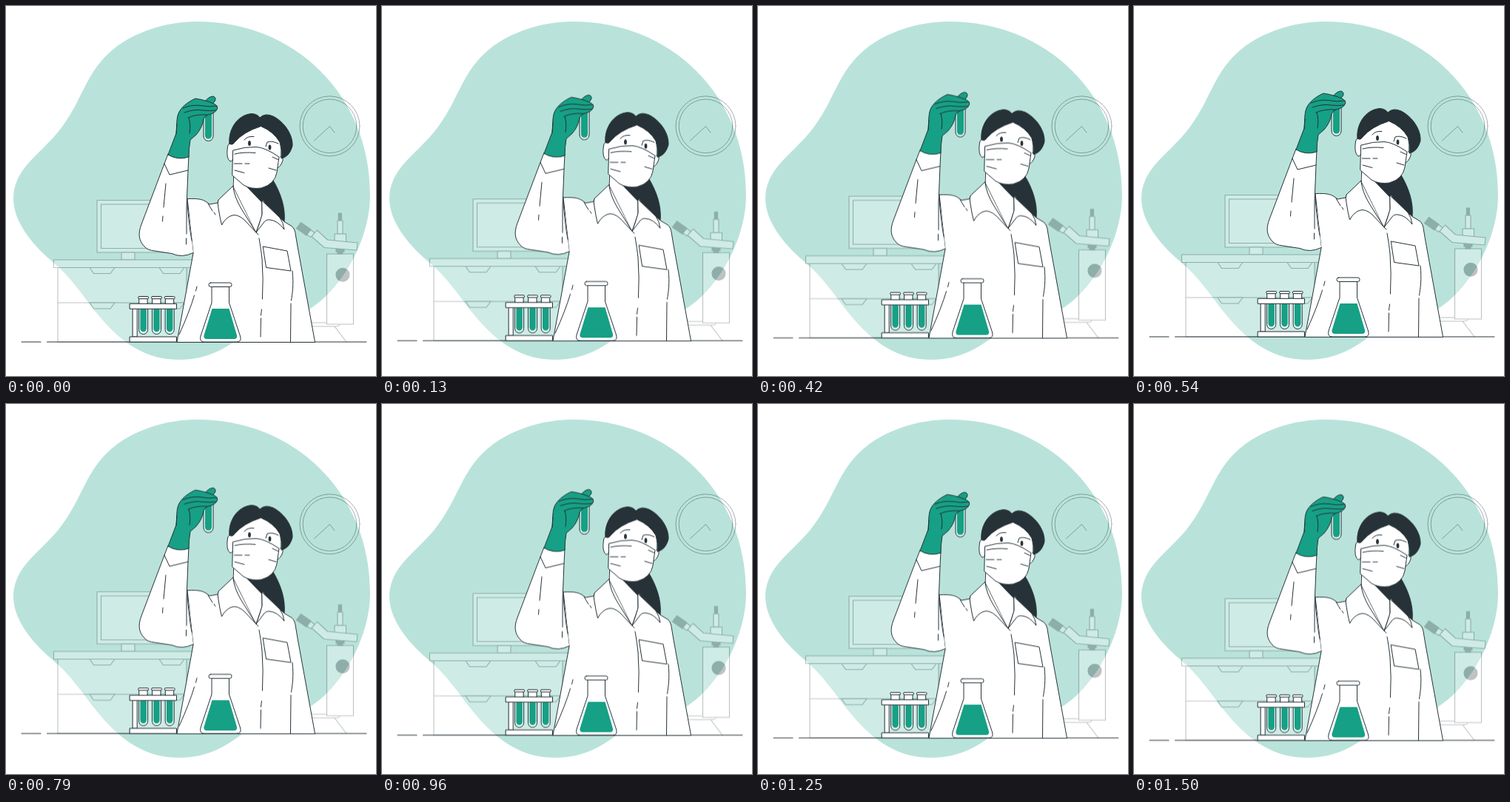
These frames come from a looping animation (500x500 px, 1540 ms). An HTML page:

```html
<!DOCTYPE html>
<html lang="en">
<head>
<meta charset="utf-8">
<title>Laboratory</title>
<style>
  html, body { margin: 0; width: 100%; height: 100%; overflow: hidden; background: #fff; }
  svg { display: block; width: 100%; height: 100%; }
  .ink { stroke: #263238; stroke-linecap: round; stroke-linejoin: round; }
  .white { fill: #fff; }
  .dark { fill: #263238; }
  .teal { fill: #16a085; }
  .line { fill: none; }
  .bare { stroke: none; }
</style>
</head>
<body>
<svg viewBox="0 0 500 500">
  <defs>
    <path id="handle" d="M113 353.5H147L141 361.5H118.5Z"/>
    <g id="tube">
      <path fill="#e3f3ef" d="M-6 402V437.5A6 6 0 0 0 6 437.5V402Z"/>
      <path class="teal bare" d="M-4.2 409V436A4.2 4.2 0 0 0 4.2 436V409Z"/>
      <rect class="white" x="-5.5" y="395.5" width="11" height="7"/>
      <rect class="white" x="-7" y="392.5" width="14" height="3.2" rx="1.6"/>
    </g>
  </defs>

  <path fill="#b9e3da" d="M258 21C215 21 174 36 148 56C121 77 111 101 100 122C88 147 75 167 58 184C37 206 10 226 10 260C10 290 33 320 61 344C88 366 104 392 121 413C146 444 180 478 233 478C276 478 300 460 322 444C350 424 385 424 411 409C450 385 492 320 492 255C492 120 390 21 258 21Z"/>

  <g class="ink line" opacity=".4">
    <circle cx="437.5" cy="162.3" r="40.5"/>
    <circle cx="437.5" cy="162.3" r="36.3"/>
    <path d="M416.5 182L437.5 162.5L444 171"/>
  </g>

  <g id="scene" class="ink" stroke-width="1">
    <g class="white" opacity=".3" stroke-width="1.1">
      <!-- monitor and desk -->
      <rect x="123" y="262.5" width="95" height="70.5"/>
      <rect x="128.5" y="268" width="84" height="59.5"/>
      <rect x="156" y="333" width="18" height="10"/>
      <rect x="70" y="353.5" width="174" height="100.5"/>
      <path d="M70 401H243"/>
      <rect x="64.5" y="343" width="189" height="10.5"/>
      <use href="#handle"/>
      <use href="#handle" x="94"/>
      <use href="#handle" y="47.5"/>
      <use href="#handle" x="94" y="47.5"/>
      <!-- microscope -->
      <path class="line" d="M444 433L460 454"/>
      <path d="M408 428H452Q451 433 447 433H408Z"/>
      <rect x="433.5" y="335" width="36" height="95"/>
      <circle class="dark" cx="455" cy="363.3" r="9"/>
      <path class="dark" d="M446 328H457V332H455V335H448V332H446Z"/>
      <rect class="dark" x="449.3" y="280" width="4.2" height="10"/>
      <rect x="448" y="290" width="7" height="18"/>
      <rect x="444" y="308" width="15.5" height="11"/>
      <path d="M411 302L417 306.5L412 312.5L406 308.5Z"/>
      <path class="dark" d="M398.5 292.5L412 302L406 310L392.5 300.5Z"/>
      <path d="M413 311.5L420.5 303L434.5 316L475 320L474 330L430 326.5Z"/>
    </g>

    <path class="line" d="M21 454H47M55.5 454H487" stroke-width="1.1"/>

    <!-- hair at the back and neck -->
    <path class="white bare" d="M308 215L306 246L338 307L350 280L362 236Z"/>
    <path class="dark" d="M314 232L346 267L347 262L366 286L376 292C378 272 371 252 360 234Z"/>

    <!-- coat -->
    <path class="white" d="M231 454L253 334L245 260.5C262 260 267 261 275 268L286 266L287 262L307 244L338 306L346 283V263L370 286L376 291.500L386 297.500Q390.500 300.500 391.500 310L394 325L417.500 454Z"/>
    <path class="white bare" d="M307 243L338 306L346 283V266L318 237L308 222Z"/>
    <path class="line" d="M308 222L307 246"/>
    <path class="line" d="M346 265V283L338 306"/>
    <path class="white" d="M307 243L287 262Q285.500 266 287 273Q289 286 291.500 296Q296 287 304 283.500Q312 280 322 289L338 306L318 274Q309 259 307 245Z"/>
    <path class="white" d="M346 263L370 286Q375 293 376 302Q367 290 357 289Q351 288 348 293L338 306L342 295L346 282Z"/>
    <path class="line" d="M273 267L279 277M281 279L283 282M338 306L341 309M342 314Q345 331 346 342Q348 368 346.500 396M345.500 410L344.500 418M344.500 422L344 447M387 358C389 377 387 388 385.500 398M385 402L384.500 454M258 379L256.500 385M254.500 391Q248 413 234 444M347.500 325L380 331L385 358L352 353.500Z"/>

    <!-- raised arm -->
    <path class="white bare" d="M219 200L214 213L183 295C178 308 179.500 317 187 325Q191 330 201 331L224 334.500Q238 341 253 333.500L248 290L244 262L246 224L247 202Z"/>
    <path class="line" d="M219 200L214 213L183 295C178 308 179.500 317 187 325Q191 330 201 331L224 334.500Q238 341 253 333.500M247 202L246 222L244 272V308M243.500 314V322M214 213L221 228L246 222M216 240L213 272M212 284L211.500 291M245 266Q247 295 251 317"/>

    <!-- tube in hand -->
    <path fill="#dcf0ec" d="M267 138V176A6.500 6.500 0 0 0 280 176V138Z"/>
    <path class="teal bare" d="M269 140V175A4.500 4.500 0 0 0 278 175V140Z"/>
    <path class="teal" d="M268 130Q274 122 280 122Q285 124 282 129L277 134Z"/>
    <path class="teal" d="M219 201L230 172C231 161 230 150 234 143C239 134 249 128 256 125Q264 126 273 129L281 132Q287 135 285.500 139Q283 145 273 147Q268 149 267 153Q265 165 257 174L249 181Q247 193 247 204Q232 209 219 201Z"/>
    <path class="line" d="M239 138Q251 133 263 134.500Q274 137 285 135M241 144Q255 139 266 141Q276 142 284 141M246 151Q256 146 272 147M247 151Q250 160 248 172M231 160L230 173"/>

    <!-- head -->
    <path class="white" d="M307 187Q301 183 299.500 190Q297 206 303 210Q307 210 307 203Z"/>
    <path class="white" d="M369 204Q375 202 374 209Q371 218 366 219Z"/>
    <path class="white bare" d="M306 185L320 165L345 158L371 182L370 210L340 240L307 220Z"/>
    <path class="dark" d="M302 186C300 168 312 147 332 145.500Q340 146 343 151Q350 144 361 149C377 157 388 175 387 189C384 201 377 205 372 206Q373 193 370 184Q362 170 344.500 162.500Q321 170 309 184Q306 189 302 186Z"/>
    <g class="dark bare">
      <ellipse cx="329" cy="185.500" rx="1.900" ry="3.600"/>
      <ellipse cx="356.500" cy="191" rx="1.900" ry="3.600"/>
    </g>
    <path class="line" d="M322 181Q326 175.500 335 176.500M351 190L353 184Q359 181.500 368 186"/>
    <path class="white" d="M307 195Q323 190 338 190.500Q350 191 369 204L366 225Q363 241 345 246Q331 248 321 242L306 229Z"/>
    <path class="line" d="M309 200Q321 197 337 198.500M308.500 213H319M323 213H329M309 222L322 225.500M360 204L367.500 207.500M355 219L365 222"/>

    <!-- rack -->
    <rect class="white" x="171.500" y="409" width="5.700" height="38"/>
    <use href="#tube" x="185.600"/>
    <use href="#tube" x="203.500"/>
    <use href="#tube" x="221.200"/>
    <rect class="white" x="167.500" y="402.300" width="63" height="7"/>
    <rect class="white" x="167.500" y="447" width="63" height="7"/>

    <!-- flask -->
    <path class="white" d="M278 379V401L263 446Q261 454 268 454H311.500Q319 454 316.500 446L301.500 401V379Z"/>
    <path class="teal bare" d="M278.500 409H301.500L312 445Q313 450 308 450H271.500Q266.500 450 267.500 445Z"/>
    <rect class="white" x="274" y="374" width="31" height="5.500" rx="2.500"/>
  </g>
</svg>
<script>
  // Steady rise and fall; the loop opens just after the lowest point.
  const LOOP = 1540, LEAD = 40;
  const [low, high] = [0.5, -9.5].map(y => `translateY(${y}px)`);
  document.getElementById("scene").animate(
    { transform: [low, high, low] },
    { duration: LOOP, delay: -LEAD, iterations: Infinity, easing: "linear" }
  );
</script>
</body>
</html>
```
